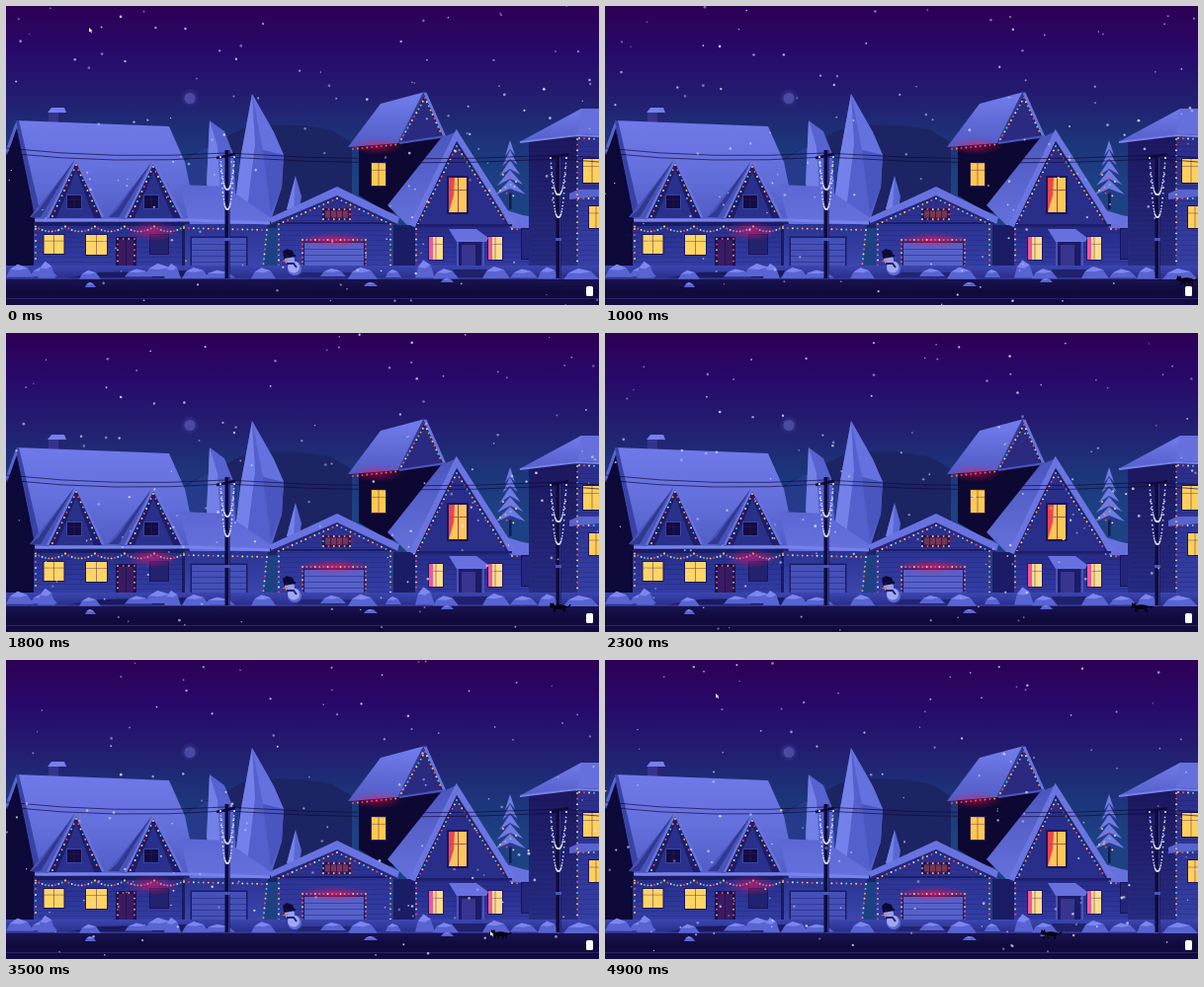
Animation of 600 by 303 pixels, one loop 5 s. Source, as an HTML page with a canvas:

```html
<!DOCTYPE html>
<html lang="en">
<head>
<meta charset="utf-8">
<title>Winter street</title>
<style>
html, body { margin: 0; width: 100%; height: 100%; overflow: hidden; background: #100a3a; }
canvas { display: block; width: 600px; height: 303px; }
</style>
</head>
<body>
<canvas id="stage" width="600" height="303"></canvas>
<script>
const W = 600, H = 303, LOOP = 5000, STEP = 100;
const view = document.getElementById('stage').getContext('2d');
const scene = document.createElement('canvas');
scene.width = W; scene.height = H;
const g = scene.getContext('2d');

function seeded(s) {
  return () => {
    s = (s + 0x6D2B79F5) | 0;
    let t = Math.imul(s ^ (s >>> 15), 1 | s);
    t = (t + Math.imul(t ^ (t >>> 7), 61 | t)) ^ t;
    return ((t ^ (t >>> 14)) >>> 0) / 4294967296;
  };
}

// Points are written as "x,y x,y".
const points = s => s.split(' ').map(p => p.split(',').map(Number));
function trace(c, s) {
  c.beginPath();
  points(s).forEach(([x, y], i) => i ? c.lineTo(x, y) : c.moveTo(x, y));
}
function poly(s, fill) { trace(g, s); g.closePath(); g.fillStyle = fill; g.fill(); }
function line(s, color, w = 1) { trace(g, s); g.strokeStyle = color; g.lineWidth = w; g.stroke(); }
function rect(x, y, w, h, fill) { g.fillStyle = fill; g.fillRect(x, y, w, h); }
function dot(c, x, y, r, fill) { c.beginPath(); c.arc(x, y, r, 0, 7); c.fillStyle = fill; c.fill(); }
function fade(y0, y1, ...colors) {
  const f = g.createLinearGradient(0, y0, 0, y1);
  colors.forEach((c, i) => f.addColorStop(i / (colors.length - 1), c));
  return f;
}
function glow(x, y, rx, ry, rgb, a) {
  g.save();
  g.translate(x, y); g.scale(rx, ry);
  const f = g.createRadialGradient(0, 0, 0, 0, 0, 1);
  f.addColorStop(0, `rgba(${rgb},${a})`);
  f.addColorStop(1, `rgba(${rgb},0)`);
  g.fillStyle = f; g.fillRect(-1, -1, 2, 2);
  g.restore();
}

const BULBS = ['#ffd45a', '#ff4a60', '#ffe9b0', '#5ad0c0', '#ff9a48'];
function bulbs(s, gap = 5, colors = BULBS, r = 0.95) {
  const p = points(s);
  let n = 0;
  for (let i = 1; i < p.length; i++) {
    const [ax, ay] = p[i - 1], [bx, by] = p[i];
    const count = Math.max(1, Math.round(Math.hypot(bx - ax, by - ay) / gap));
    for (let k = 0; k < count; k++, n++) {
      dot(g, ax + (bx - ax) * k / count, ay + (by - ay) * k / count, r, colors[n % colors.length]);
    }
  }
}
function swag(x0, x1, y, sag, gap, colors, r) {
  const n = Math.round((x1 - x0) / gap);
  for (let i = 0; i <= n; i++) {
    const u = i / n;
    dot(g, x0 + (x1 - x0) * u, y + sag * 4 * u * (1 - u), r, colors[i % colors.length]);
  }
}
function pane(x, y, w, h, fill, frame = '#1c1458') {
  rect(x - 1, y - 1, w + 2, h + 2, frame);
  rect(x, y, w, h, fill);
  rect(x + w / 2 - 0.4, y, 0.8, h, 'rgba(70,30,80,.6)');
  rect(x, y + h * 0.3, w, 0.8, 'rgba(70,30,80,.5)');
}
function shutter(x, y, w, h, fill) {
  rect(x - 1.5, y - 1.5, w + 3, h + 2, '#1b1c66');
  rect(x, y, w, h, fill);
  for (let k = y + 6; k < y + h; k += 6) rect(x, k, w, 0.8, 'rgba(25,25,110,.55)');
}
function siding(x, y, w, h) {
  for (let k = y; k < y + h; k += 5) rect(x, k, w, 0.6, 'rgba(18,18,85,.3)');
}
function drift(x, y, w, h) {
  const at = (a, b) => `${x + w * a},${y - h * b}`;
  poly([at(0, 0), at(.14, .6), at(.42, 1), at(.78, .72), at(1, 0)].join(' '), '#5864d2');
  poly([at(.14, .6), at(.42, 1), at(.78, .72), at(.5, .55)].join(' '), '#7d86ef');
}

function sky() {
  rect(0, 0, W, H, fade(0, 180, '#2d0054', '#28096a', '#231c70', '#1d3379', '#1c4283'));
  glow(186, 93, 10, 10, '110,120,220', .35);
  dot(g, 186, 93.5, 5.5, '#4b4aa2');
  poly('172,160 198,145 240,124 262,120 300,121 328,125 350,138 350,225 172,225', '#1c2463');
  poly('174,160 202,143 236,150 240,215 174,215', '#253b8a');
  poly('206,116 221,127 230,150 233,205 210,205 203,180', '#5663d0');
  poly('206,116 214,142 218,205 210,205 203,180', '#7380e8');
  poly('249,89 271,128 281,151 279,184 268,218 230,216 238,150', '#5360cd');
  poly('249,89 252,140 243,214 230,216 238,150', '#7481ea');
  poly('249,89 271,128 281,151 260,146', '#6471de');
  poly('260,146 281,151 279,184 268,210', '#4956c0');
  poly('293,172 299,193 297,206 284,206', '#5a67d4');
  poly('293,172 291,206 284,206', '#7481e8');
}

function leftHouse() {
  rect(43, 106, 17, 18, '#34348c');
  rect(53, 108, 7, 16, '#25256f');
  poly('42,108 46,103 59,103 61,108', '#777fec');
  poly('0,150 10,122 31,218 29,266 0,266', '#0d0938');
  line('0,150 11,119', '#5a64d0', 3);
  poly('10,116 165,122 181,158 193,216 31,219', fade(116, 218, '#6f79e9', '#6470dc', '#515cc5'));
  poly('10,116 13,116 37,219 30,219', '#3943a6');
  poly('176,181 222,183 267,214 267,221 186,221', fade(182, 220, '#5c67d4', '#6771dd'));
  rect(28, 221, 152, 46, fade(221, 266, '#272f8b', '#333ea4'));
  siding(28, 224, 152, 40);
  rect(28, 219, 152, 4, '#1a1c62');
  poly('179,221 265,221 260,270 179,270', fade(221, 270, '#2a3391', '#3d4ab1'));
  rect(178, 221, 3, 47, '#191b60');
  line('29,217 188,217 267,220', '#7882ec', 3);
  dormer(71, 155, 43, 97, 24);
  dormer(149, 157, 122, 177, 103);
  pane(38.5, 232, 20, 19, '#ffd566');
  pane(81, 232, 21, 20, '#ffd566');
  rect(111, 234, 21, 33, '#181255');
  rect(114, 237, 15, 30, '#3a1b62');
  rect(121, 238, 1, 29, '#21124d');
  pane(146, 232, 18, 19, '#202370');
  bulbs('113,264 113,236 130,236 130,264', 6, ['#ff4a60', '#ffb060']);
  shutter(188, 235, 55, 34, '#4551b8');
  for (let x = 30; x < 180; x += 30) swag(x, x + 30, 223.5, 5, 3.5, BULBS, 0.9);
  bulbs('180,225 264,227 260,266', 5);
  bulbs('30,226 30,262', 6);
  glow(148, 228, 27, 10, '255,20,100', .55);
}
function dormer(x, y, left, right, back) {
  poly(`${x},${y} ${back},214 ${left},216`, '#4953b9');
  poly(`${x - 1},${y} ${back + 9},207 ${back + 1},214 ${left - 8},214`, '#303991');
  poly(`${x},${y} ${right},215 ${left},215`, '#1d1d69');
  poly(`${x},${y + 11} ${right - 8},215 ${left + 8},215`, '#29318c');
  line(`${left - 1},215 ${x},${y + 1} ${right + 1},214`, '#6873de', 2.4);
  pane(x - 9, 192, 14, 13, '#120d43', '#3a43a5');
  bulbs(`${left + 4},213 ${x},${y + 6} ${right - 3},213`, 5.5);
}

function middleGarage() {
  poly('335,188 390,217 390,270 274,270 274,217', fade(190, 270, '#272c88', '#3440a6'));
  siding(276, 212, 112, 56);
  poly('335,183 398,214 396,222 335,193 269,221 266,215', '#6973e0');
  line('269,221 335,193 396,222', '#24267a', 2);
  rect(275, 219, 115, 2, '#1b1c66');
  rect(320, 205, 29, 12, '#1b1255');
  rect(323, 207.5, 23, 7, '#574052');
  for (let x = 328; x < 346; x += 6) rect(x, 207, 1, 8, '#1b1255');
  bulbs('321,206 348,206 348,216 321,216 321,206', 5);
  shutter(302, 240, 60, 30, '#5661c9');
  glow(332, 237, 38, 8, '255,20,90', .6);
  bulbs('300,268 300,237 364,237 364,268', 4.2, ['#ff4a60', '#ffd45a', '#ff6a70']);
  bulbs('276,268 276,221 335,195 389,221 389,268', 5);
  glow(337, 211, 20, 9, '255,20,90', .25);
}

function gableHouse() {
  poly('357,140 424,92 444,134 404,212 384,208 357,192', '#0c0832');
  poly('399,139 424,92 442,134', '#2a2a80');
  poly('379,99 424,87 398,139 346,143', fade(88, 142, '#737dec', '#515cc5'));
  line('424,87 398,139', '#313993', 3);
  line('424,88 444,133', '#6a74df', 3);
  line('398,139 444,132', '#4c56bd', 2);
  bulbs('400,135 424,93 441,131', 4.5);
  bulbs('351,145 399,140', 5, ['#ff4a60', '#ff9a48']);
  glow(375, 142, 28, 9, '255,20,80', .45);
  pane(370, 159, 14, 23, '#ffc950', '#3b205c');
  poly('440,134 456,127 408,224 386,202', fade(130, 222, '#4b56bf', '#6570da'));
  poly('455,139 513,224 415,224', '#292e8a');
  rect(413, 221, 146, 46, fade(221, 266, '#252a85', '#333ca4'));
  rect(392, 222, 22, 46, '#1b1c66');
  siding(414, 184, 0, 40);
  siding(414, 224, 145, 40);
  poly('500,205 523,212 566,220 566,228 510,225', '#6771de');
  line('411,223 456,131 513,221', '#6b75e1', 6);
  line('416,222 456,139 507,221', '#20216f', 2);
  bulbs('417,221 456,142 506,220', 5);
  bulbs('512,226 563,229', 5);
  rect(415, 221, 97, 2.5, '#1d1d68');
  rect(446, 172, 22, 39, '#1e1558');
  rect(448, 174, 18, 35, '#ffc65a');
  poly('448,174 454,174 453,192 448,209', '#f24450');
  rect(457, 174, 1, 35, '#8d4650');
  rect(448, 186, 18, 1, '#a75750');
  for (const x of [428, 488]) {
    pane(x, 234, 14, 23, '#ffdd90', '#211965');
    rect(x, 234, 4, 23, '#f0569a');
  }
  rect(457, 239, 24, 28, '#1d1b65');
  rect(461, 242, 14, 25, '#37358f');
  rect(456, 238, 2, 29, '#4953b8');
  rect(482, 238, 2, 29, '#4953b8');
  poly('448,226 476,226 488,235 486,239 456,239', '#6771de');
  pane(522, 226, 30, 30, '#24257c', '#15145a');
  bulbs('415,226 415,263', 5.5);
}

function fir() {
  rect(509, 146, 2.5, 60, '#18194f');
  for (let i = 0; i < 5; i++) {
    const y = 142 + i * 10, w = 5 + i * 2.7;
    poly(`510,${y - 5} ${510 + w},${y + 11} 512,${y + 7} ${510 - w},${y + 12}`, '#283b8c');
    poly(`510,${y - 6} ${510 + w},${y + 9} 510,${y + 3} ${510 - w},${y + 10}`, '#6e7be3');
  }
  bulbs('503,171 516,178 500,187 520,195', 7);
}

function rightHouse() {
  rect(529, 133, 49, 134, fade(133, 266, '#1c185e', '#272c82'));
  rect(578, 130, 22, 137, fade(130, 266, '#2b2d88', '#3540a4'));
  siding(531, 142, 69, 120);
  poly('582,104 600,104 600,131 578,130 519,138', fade(104, 136, '#717bea', '#5761cc'));
  poly('582,104 600,104 600,130 578,129', '#6570dc');
  line('520,138 578,131 600,132', '#7882eb', 2);
  pane(584, 155, 18, 24, '#ffd05c');
  pane(590, 203, 14, 22, '#ffd05c');
  poly('570,190 579,186 600,186 600,193 570,196', '#5a64cf');
  bulbs('578,135 578,264', 5.5);
  bulbs('580,134 600,135', 5);
  bulbs('579,195 600,195', 5);
}

function ground() {
  rect(0, 263, W, 15, fade(263, 278, '#3b46b0', '#262a84'));
  poly('95,270 185,268 235,276 60,276', '#191a60');
  poly('300,270 364,270 378,277 292,277', '#222473');
  poly('453,267 487,267 500,277 440,277', '#20216d');
  rect(0, 276, W, 27, fade(276, 303, '#191452', '#100a3c', '#120b40'));
  rect(0, 275.5, W, 1.2, '#3c43a3');
  rect(0, 296, W, 1, '#2b2268');
  const r = seeded(12);
  [[0, 28, 13], [24, 28, 10], [32, 18, 17], [74, 22, 9], [120, 28, 8], [140, 32, 13], [160, 17, 15],
   [178, 28, 11], [200, 32, 8], [248, 25, 11], [318, 26, 8], [346, 30, 12], [384, 16, 8],
   [414, 20, 18], [432, 26, 10], [482, 28, 12], [510, 28, 9], [538, 22, 12], [564, 36, 11]]
    .forEach(([x, w, h]) => drift(x, 274 + r() * 3, w, h));
  drift(80, 285, 11, 5);
  drift(362, 284, 14, 4);
  drift(440, 280, 13, 4);
}

function snowman() {
  dot(g, 292, 266, 7, '#626ed6');
  dot(g, 291, 264.5, 6, '#a1a8f3');
  dot(g, 287, 257, 5, '#989ff0');
  poly('281,254 280,249 284,246 290,248 292,253', '#0e0a36');
  line('281,255 293,253', '#0e0a36', 2);
  poly('285,257 279,258.5 285,259.5', '#e17a52');
  line('284,261 291,261 294,265', '#26206c', 2);
}

function pole(x, top, left, right) {
  rect(x - 2.5, top, 5, 276 - top, '#100b3d');
  rect(x + 1, top, 1.2, 276 - top, '#333688');
  rect(x - 3, 235, 6, 3, '#4b55b9');
  line(`${left},154 ${right},150`, '#0e0a38', 2.5);
}
function wires() {
  g.lineWidth = 0.8;
  g.strokeStyle = 'rgba(15,10,58,.85)';
  [[144, 151], [149, 155]].forEach(([a, b]) => {
    g.beginPath();
    g.moveTo(0, a);
    g.quadraticCurveTo(110, a + 12, 222, b - 2);
    g.quadraticCurveTo(390, b + 9, 559, b);
    g.lineTo(600, b + 3);
    g.stroke();
  });
}
function hanging(x0, x1, y, sag) {
  const white = ['#f2f2ff', '#b9c4ff'];
  for (const k of [1, 0.62]) {
    for (let i = 0; i <= 34; i++) {
      const u = i / 34, bow = 1 - Math.abs(2 * u - 1) ** 2.6;
      dot(g, x0 + (x1 - x0) * u, y + sag * k * bow, 0.85, white[i % 2]);
    }
  }
}

function build() {
  sky();
  fir();
  leftHouse();
  gableHouse();
  middleGarage();
  rightHouse();
  ground();
  wires();
  pole(224, 146, 213, 232);
  pole(559, 151, 549, 569);
  hanging(217, 231, 153, 53);
  hanging(551, 567, 154, 60);
  snowman();
}

const rnd = seeded(2024);
const flakes = Array.from({ length: 125 }, () => {
  const size = rnd();
  return {
    x: rnd() * W, y: rnd() * (H + 8), r: 0.65 + size * 0.75, a: 0.4 + rnd() * 0.5,
    vy: 12 + size * 20, vx: (rnd() - 0.5) * 9
  };
});
const wrap = (v, n) => ((v % n) + n) % n;

function snow(t) {
  const s = t / 1000;
  for (const f of flakes) {
    dot(view, wrap(f.x + f.vx * s, W), wrap(f.y + f.vy * s, H + 8) - 4, f.r, `rgba(226,226,255,${f.a})`);
  }
}

function cat(t) {
  const c = view, step = t / 100 * 1.25;
  c.save();
  c.translate(623.5 - 0.0352 * t, 278);
  c.fillStyle = c.strokeStyle = '#05030f';
  c.beginPath(); c.ellipse(0, -0.4, 7, 2.3, 0, 0, 7); c.fill();
  c.beginPath(); c.ellipse(-7.5, -1.4, 2.6, 2.1, 0, 0, 7); c.fill();
  trace(c, '-9.5,-2.2 -9.3,-5 -7.6,-3.4 -6,-5 -5.6,-2');
  c.fill();
  c.lineWidth = 1.3;
  [-5, -3.6, 4, 5.5].forEach((x, i) => {
    c.beginPath();
    c.moveTo(x, 0);
    c.lineTo(x + Math.sin(step + i * 2.2) * 2.4, 4.6);
    c.stroke();
  });
  c.beginPath();
  c.moveTo(6, -1);
  c.quadraticCurveTo(8.5, 1, 11, -2 + Math.sin(step / 2));
  c.stroke();
  c.restore();
}

// time, x, y of the pointer
const PATH = [[2600, 395, 259], [2800, 423, 263], [3500, 491, 277], [3800, 460, 266],
  [4300, 275, 202], [4900, 113, 36], [5000, 85, 24]];
function pointer(t) {
  if (t === 0) t = LOOP;
  if (t < PATH[0][0]) return;
  const i = Math.max(1, PATH.findIndex(p => p[0] >= t));
  const [a, ax, ay] = PATH[i - 1], [b, bx, by] = PATH[i];
  const u = (t - a) / (b - a);
  view.save();
  view.translate(ax + (bx - ax) * u, ay + (by - ay) * u);
  trace(view, '-1,-2 -1,2.6 0.2,1.6 1.2,3.2 2,2.8 1.2,1.3 2.6,1.2');
  view.closePath();
  view.lineWidth = 0.9;
  view.strokeStyle = '#15092f';
  view.stroke();
  view.fillStyle = '#f4f4ff';
  view.fill();
  view.restore();
}

function badge() {
  view.fillStyle = '#fff';
  view.beginPath();
  view.roundRect(587, 284, 7, 10, 1.5);
  view.fill();
}

function frame() {
  const t = Math.floor(performance.now() % LOOP / STEP) * STEP;
  view.drawImage(scene, 0, 0);
  cat(t);
  snow(t);
  badge();
  pointer(t);
  requestAnimationFrame(frame);
}

build();
frame();
</script>
</body>
</html>
```
